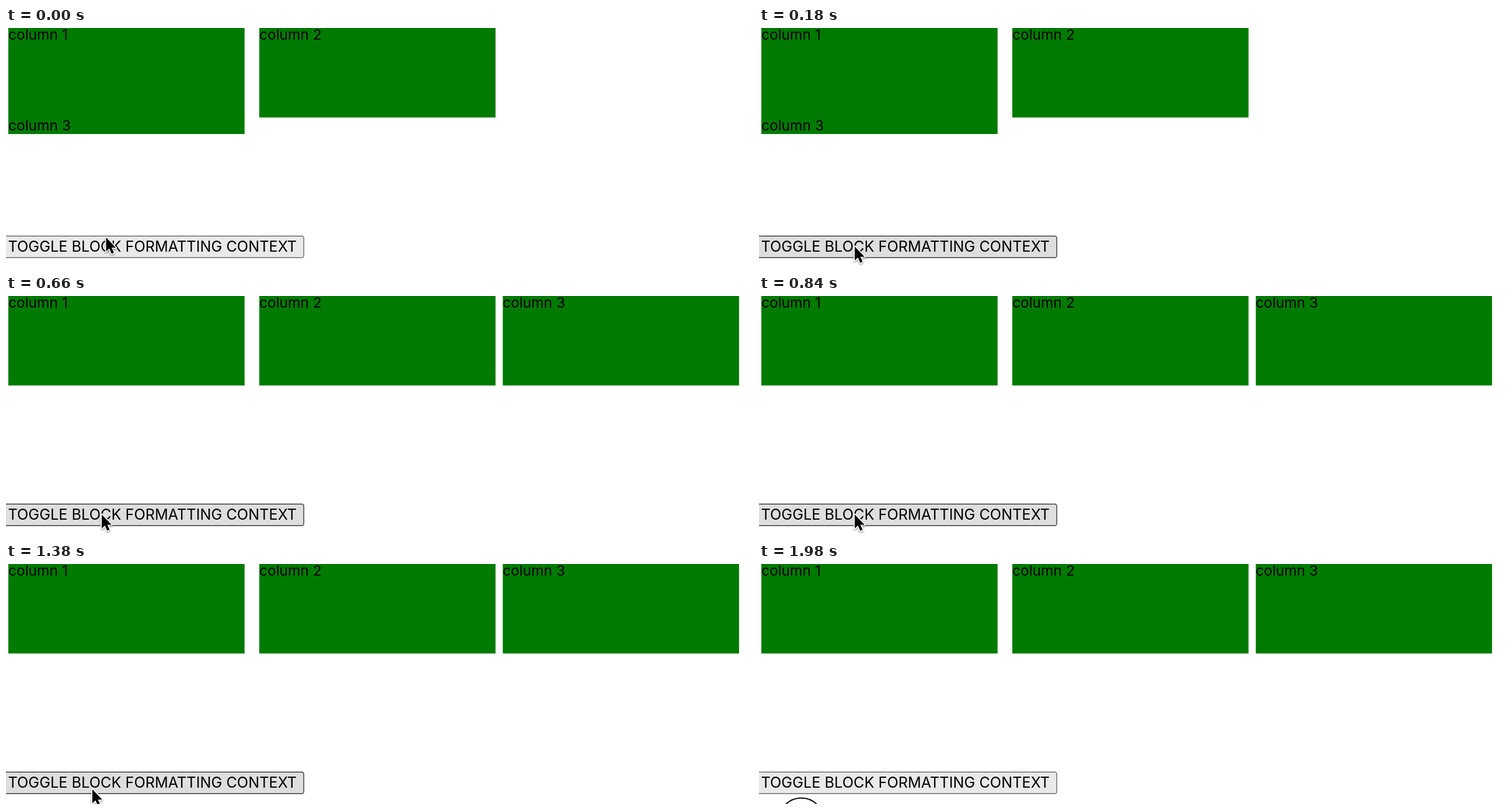
An HTML page that plays this animation: 1280 by 412 pixels, repeating every 2040 ms.

```html
<!DOCTYPE html>
<html lang="en">
<head>
<meta charset="utf-8">
<title>Block formatting context</title>
<style>
  html, body { margin: 0; width: 100%; height: 100%; overflow: hidden; background: #fff; }
  svg { display: block; }
  text { font: 400 24.5px Inter, Arial, sans-serif; font-optical-sizing: none; fill: #000; }
  #label { font-size: 25.25px; }
  .box { fill: #007a00; }
  #button { stroke-width: 1.4; }
  #button.normal { fill: #e9e9e9; stroke: #6b6b6b; }
  #button.hover { fill: #dedede; stroke: #3a3a3a; }
  #button.active { fill: #f1f1f1; stroke: #8a8a8a; }
  #ring { fill: none; stroke: #000; stroke-width: 2; }
  #cursor { filter: drop-shadow(0 2px 1.5px rgba(0, 0, 0, .35)); }
  #cursor path { fill: #000; stroke: #fff; stroke-width: 3.4; stroke-linejoin: round; paint-order: stroke; }
</style>
</head>
<body>
<svg width="1280" height="412" viewBox="0 0 1280 412">
  <rect class="box" x="4" y="-10" width="404.8" height="163.6"/>
  <text x="4" y="19.5">column 1</text>
  <rect class="box" x="434" y="-10" width="404.8" height="163.6"/>
  <text x="434" y="19.5">column 2</text>
  <g id="wrapped">
    <rect class="box" x="4" y="153" width="404.8" height="29"/>
    <text x="4" y="176">column 3</text>
  </g>
  <g id="beside">
    <rect class="box" x="851.3" y="-10" width="404.8" height="163.6"/>
    <text x="851" y="19.5">column 3</text>
  </g>
  <rect id="button" x="-10" y="357.3" width="520.3" height="37" rx="3.5"/>
  <text id="label" x="3.5" y="384">TOGGLE BLOCK FORMATTING CONTEXT</text>
  <circle id="ring" r="38.3"/>
  <g id="cursor"><path d="M0 0V24L5.5 19L9.5 28L13.5 26.2L9.6 17.8H17Z"/></g>
</svg>
<script>
  const LOOP = 2040, STEP = 60;
  const $ = id => document.getElementById(id);
  const wrapped = $('wrapped'), beside = $('beside');
  const button = $('button'), ring = $('ring'), cursor = $('cursor');

  const enter = [171.5, 359.5], rest = [164, 375], leave = [74.5, 440];

  // [time, from, to, progress]
  const moves = [
    [0, enter, rest, 0],
    [60, enter, rest, .4],
    [120, enter, rest, .8],
    [180, enter, rest, 1],
    [1320, rest, leave, .05],
    [1380, rest, leave, .18],
    [1440, rest, leave, .37],
    [1500, rest, leave, .54],
    [1560, rest, leave, .8],
    [1620, rest, leave, 1]
  ];
  const states = [
    [0, 'normal'], [60, 'hover'], [540, 'active'], [660, 'hover'], [1440, 'normal']
  ];

  const latest = (table, t) => table.filter(row => row[0] <= t).pop();
  const show = (el, on) => el.setAttribute('visibility', on ? 'visible' : 'hidden');

  function draw(time) {
    const t = Math.floor(time % LOOP / STEP) * STEP;
    const [, from, to, p] = latest(moves, t);
    const [x, y] = from.map((v, i) => v + (to[i] - v) * p);
    const toggled = t >= 660;

    show(wrapped, !toggled);
    show(beside, toggled);
    button.setAttribute('class', latest(states, t)[1]);
    cursor.setAttribute('transform', `translate(${x} ${y})`);
    ring.setAttribute('cx', x - 2);
    ring.setAttribute('cy', y);
    show(ring, (t >= 540 && t < 660) || t >= 1980);
  }

  const start = performance.now();
  function tick() {
    draw(performance.now() - start);
    requestAnimationFrame(tick);
  }
  tick();
</script>
</body>
</html>
```
